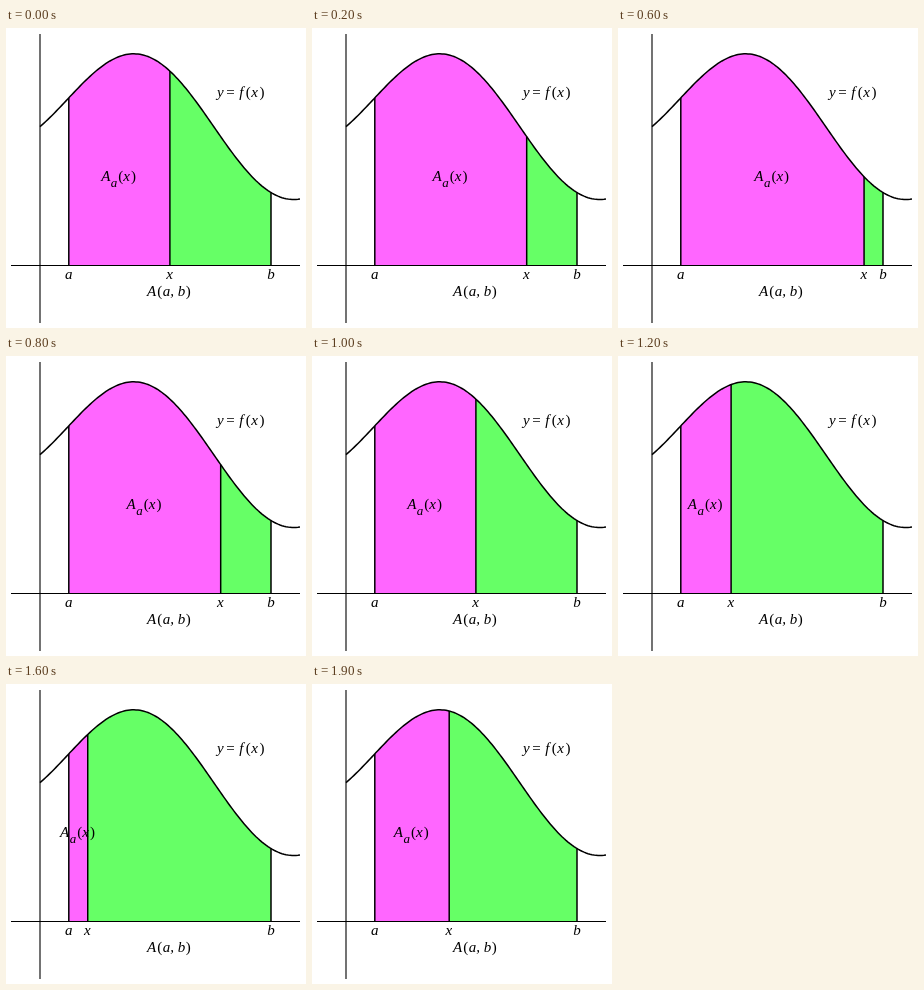
An HTML page for the animation above (2000 ms loop, 300 px wide and 300 px high).

```html
<!DOCTYPE html>
<html lang="en">
<head>
<meta charset="utf-8">
<title>Area function</title>
<style>
  html, body { margin: 0; width: 100%; height: 100%; overflow: hidden; background: #fff; }
  svg { display: block; width: 100vw; height: 100vh; }
  .line { fill: none; stroke: #000; stroke-width: 1.5; }
  .axis { stroke: #000; stroke-width: 1.1; }
  text { font: italic 15px "Liberation Serif", "Times New Roman", serif; }
  .upright { font-style: normal; }
  .sub { font-size: 13px; }
  .mid { text-anchor: middle; }
</style>
</head>
<body>
<svg viewBox="0 0 300 300">
  <path id="left" fill="#f6f"/>
  <path id="right" fill="#6f6"/>
  <path class="axis" d="M5 237.5H294M34 6V295"/>
  <path id="curve" class="line"/>
  <path id="bounds" class="line"/>
  <path id="divider" class="line"/>
  <text x="211" y="69">y<tspan class="upright" dx="2.5">=</tspan><tspan dx="4.5">f</tspan><tspan class="upright" dx="2.5">(</tspan><tspan dx="0.5">x</tspan><tspan class="upright" dx="1.5">)</tspan></text>
  <text x="141" y="268">A<tspan class="upright" dx="1">(</tspan><tspan dx="0.5">a, b</tspan><tspan class="upright" dx="0.5">)</tspan></text>
  <text class="mid" x="62.8" y="251">a</text>
  <text class="mid" x="265" y="251">b</text>
  <text id="xLabel" class="mid" y="251">x</text>
  <text id="areaLabel" y="153">A<tspan class="sub" dx="0.5" dy="5.5">a</tspan><tspan class="upright" dx="1" dy="-5.5">(</tspan>x<tspan class="upright" dx="1">)</tspan></text>
</svg>
<script>
  const LOOP = 2000, STEP = 100;
  const A = 62.8, B = 265, BASE = 237.5, CENTER = 163.9, SWING = 86.4;
  const $ = id => document.getElementById(id);

  const f = x => 98.7 + 58.4 * Math.sin(0.0215 * (x - 207.8)) + 0.189 * (x - 207.8);

  function curvePoints(from, to) {
    const points = [];
    for (let x = from; x < to; x += 2) points.push(`${x} ${f(x).toFixed(2)}`);
    points.push(`${to} ${f(to).toFixed(2)}`);
    return points.join('L');
  }
  const area = (from, to) => `M${from} ${BASE}L${curvePoints(from, to)}V${BASE}Z`;
  const upright = x => `M${x} ${BASE}V${f(x)}`;

  $('curve').setAttribute('d', 'M' + curvePoints(34, 294));
  $('bounds').setAttribute('d', upright(A) + upright(B));

  function draw(now) {
    const t = Math.floor((now % LOOP) / STEP) * STEP;
    const x = CENTER + SWING * Math.sin(2 * Math.PI * t / LOOP);
    $('left').setAttribute('d', area(A, x));
    $('right').setAttribute('d', area(x, B));
    $('divider').setAttribute('d', upright(x));
    $('xLabel').setAttribute('x', x - 0.3);
    $('areaLabel').setAttribute('x', (A + x) / 2 - 18.2);
  }

  const start = performance.now();
  function tick() {
    draw(performance.now() - start);
    requestAnimationFrame(tick);
  }
  tick();
</script>
</body>
</html>
```
